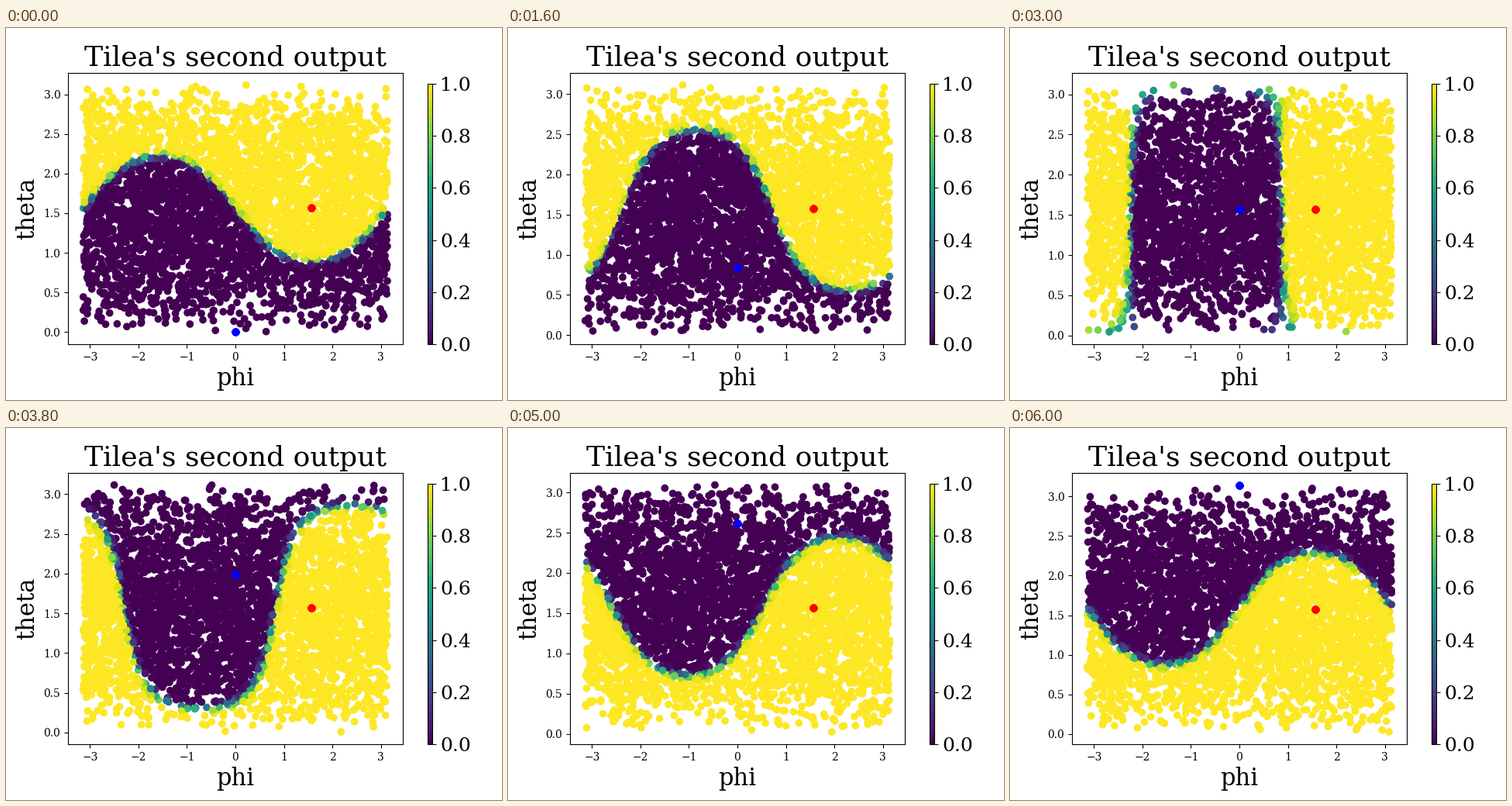
A matplotlib script that plays this animation: 640x480 px, repeating every 6200 ms.

```python
import numpy as np
import matplotlib.pyplot as plt
from matplotlib.animation import FuncAnimation

FRAMES, STEP_MS = 31, 200
POINTS = 4000
SHARPNESS = 40
RED_WEIGHT = 0.82
OFFSET = 0.02

plt.rcParams["font.family"] = "DejaVu Serif"


def direction(phi, theta):
    return np.array([np.sin(theta) * np.cos(phi),
                     np.sin(theta) * np.sin(phi),
                     np.cos(theta)])


def blue_angle(step):
    return np.pi * step / (FRAMES - 1)


def sample(step):
    """Random directions on the sphere and the output probability of each."""
    rng = np.random.default_rng(step)
    phi = rng.uniform(-np.pi, np.pi, POINTS)
    theta = np.arccos(rng.uniform(-1, 1, POINTS))
    # The plane that splits the sphere follows both measurement directions
    normal = RED_WEIGHT * direction(np.pi / 2, np.pi / 2) - direction(0, blue_angle(step))
    normal[2] -= 2 * OFFSET
    side = normal @ direction(phi, theta) + OFFSET
    return np.column_stack([phi, theta]), 1 / (1 + np.exp(-SHARPNESS * side))


def dot(phi, theta, color):
    # Stacked copies give the dot its crisp edge
    return ax.scatter([phi] * 30, [theta] * 30, color=color, zorder=3)


fig, ax = plt.subplots(figsize=(6.4, 4.8), dpi=100)
fig.subplots_adjust(left=0.125, right=0.8, bottom=0.15, top=0.88)

points, prob = sample(0)
cloud = ax.scatter(*points.T, c=prob, cmap="viridis", vmin=0, vmax=1)
red = dot(np.pi / 2, np.pi / 2, "red")
blue = dot(0, 0, "blue")

ax.set_xlim(-1.1 * np.pi, 1.1 * np.pi)
ax.set_title("Tilea's second output", fontsize=26)
ax.set_xlabel("phi", fontsize=22)
ax.set_ylabel("theta", fontsize=22)

bar = fig.colorbar(cloud, cax=fig.add_axes([0.85, 0.15, 0.01, 0.7]))
bar.ax.tick_params(labelsize=18)


def update(step):
    points, prob = sample(step)
    angle = blue_angle(step)
    cloud.set_offsets(points)
    cloud.set_array(prob)
    blue.set_offsets([[0, angle]] * 30)
    # Fit the height to the data with a 5 % margin
    low = min(points[:, 1].min(), angle)
    high = max(points[:, 1].max(), angle)
    margin = 0.05 * (high - low)
    ax.set_ylim(low - margin, high + margin)
    return cloud, blue


anim = FuncAnimation(fig, update, frames=FRAMES, interval=STEP_MS,
                     repeat=True, repeat_delay=0, blit=False)
plt.show()
```
